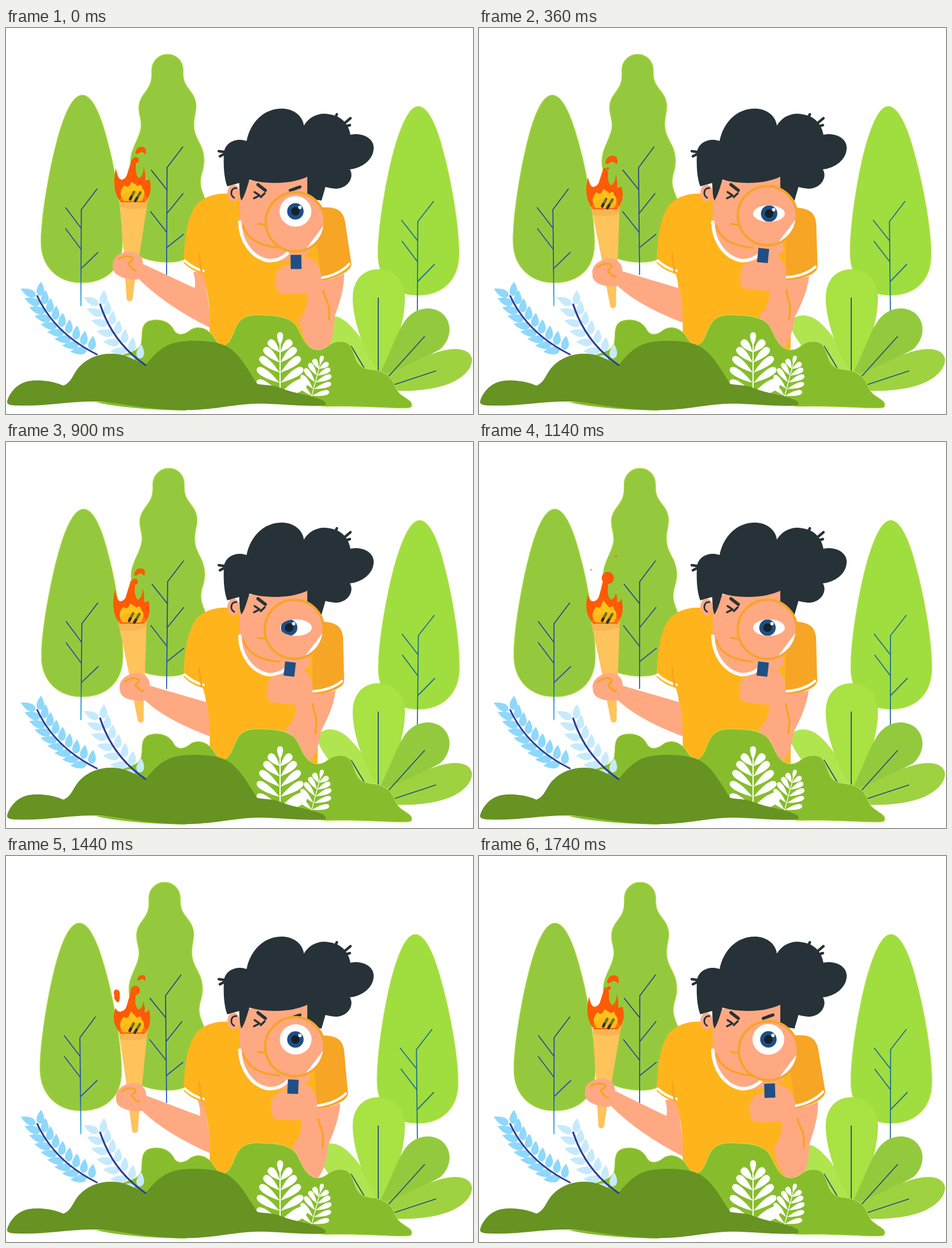
Animation, 823 px wide and 680 px high, one loop 1.8 s. Source, as an HTML page:

```html
<!DOCTYPE html>
<html lang="en">
<head>
<meta charset="utf-8">
<title>Explorer in the bushes</title>
<style>
html, body { margin: 0; width: 100%; height: 100%; overflow: hidden; background: #fff; }
svg { display: block; width: 823px; height: 680px; }
.line { fill: none; stroke-linecap: round; stroke-linejoin: round; }
.halo { stroke: #c6e65c; stroke-width: 1; }
.twig { fill: none; stroke-width: 1.8; }
.skin { fill: #ffa983; }
.fold { stroke: #f7a41f; stroke-width: 3.5; }
.white { stroke: #fff; stroke-width: 4.5; }
.ink { stroke: #263238; }
.fire { fill: #ff5a05; }
.stem { stroke: #2e3f98; stroke-width: 3; }
</style>
</head>
<body>
<svg viewBox="0 0 823 680" xmlns="http://www.w3.org/2000/svg">
  <defs>
    <linearGradient id="bark" gradientUnits="userSpaceOnUse" x1="0" y1="280" x2="0" y2="490">
      <stop offset="0" stop-color="#23468f"/><stop offset=".7" stop-color="#2458b0"/><stop offset="1" stop-color="#27b4ef"/>
    </linearGradient>
    <clipPath id="eyeClip"><ellipse id="eyeHole"/></clipPath>
  </defs>

  <g id="treeMid">
    <path class="halo" fill="#95c93d" d="M283 46C300 46 311 59 311 75C310 98 318 102 328 117C338 134 333 146 331 160C328 180 334 191 342 206C350 222 350 241 344 258C339 278 346 288 352 305C362 340 362 390 320 406C306 412 297 413 285 413C262 413 240 407 226 398C205 375 210 330 219 300C230 275 221 262 219 245C216 225 223 212 230 196C238 178 238 170 235 157C230 138 233 127 243 114C252 102 256 95 255 75C255 59 267 46 283 46Z"/>
    <path class="twig" stroke="url(#bark)" d="M283 435V246L311 209M283 285L255 250M283 327L312 291M283 360L254 323M283 387L313 363"/>
  </g>
  <g id="treeLeft">
    <path class="halo" fill="#95c93d" d="M133 118C150 118 165 150 178 200C192 250 205 330 205 378C205 425 175 449 133 449C90 449 61 420 61 376C61 330 75 250 88 200C101 150 116 118 133 118Z"/>
    <path class="twig" stroke="url(#bark)" d="M132 490V320L160 283M132 353L104 316M132 390L104 353M132 424L162 395"/>
  </g>
  <g id="treeRight">
    <path class="halo" fill="#a0dd3f" d="M725 138C742 138 758 172 770 220C785 275 798 350 798 398C798 445 768 471 726 471C683 471 655 442 655 398C655 350 667 275 681 220C694 172 709 138 725 138Z"/>
    <path class="twig" stroke="#1c6f93" d="M725 500V341L753 305M725 375L696 338M725 412L697 375M725 447L755 416"/>
  </g>

  <path fill="#b0e550" d="M547 520C555 504 578 500 600 518C625 540 645 575 658 607L600 605C580 570 555 550 547 520Z"/>
  <path fill="#a8e243" d="M656 425C688 425 703 450 703 476C703 520 682 580 658 609C635 580 611 520 611 475C611 447 627 425 656 425Z"/>
  <path fill="#93ca3d" d="M658 609C675 580 688 535 706 512C726 488 758 490 772 506C788 524 783 550 765 566C740 580 715 590 690 612Z"/>
  <path fill="#9fd241" d="M658 612C690 606 730 580 760 571C790 562 816 563 821 582C823 600 805 617 780 627C750 638 715 640 680 639Z"/>
  <path class="twig" stroke="#1d4f7c" d="M656 475V604M608 560L633 602M738 543L674 614M758 604L682 629"/>

  <path id="armL" class="skin"/>
  <g id="torch">
    <path fill="#ffc35c" d="M-26 -9H26L14 95L9 130L5 174Q0 180-5 174L-10 130L-13 95Z"/>
    <path fill="#f9b552" d="M-26 -9H26L23 11Q0 17-23 11Z"/>
    <g transform="translate(-219 -303)">
      <path class="skin" d="M187 418C185 405 197 395 211 393C221 390 231 394 237 402C243 412 240 430 232 441C222 443 205 440 195 434C189 430 186 424 187 418Z"/>
      <path class="line fold" d="M197 406C207 399 221 399 222 407C219 411 211 411 217 417C221 422 225 427 228 424"/>
    </g>
  </g>
  <g id="fire">
    <path id="flame" class="fire"/>
    <circle id="bud" class="fire" r="11"/>
    <path id="spark" class="fire" d="M-11 5C-10 -8 0 -11 8 -7C12 -2 11 4 9 7C5 1 0 1 -3 4C-6 6-9 7-11 5Z"/>
    <path id="ember" class="fire" d="M-3 -12C4 -13 7 -6 5 0C6 6 5 13 1 13C-4 9-7 5-5 0C-7 -5-7 -10-3 -12Z"/>
    <path id="glow" fill="#ffc21a"/>
    <path fill="#f8a11f" fill-opacity=".35" d="M-25 0C-22 -14-10 -17 0 -17C10 -17 22 -14 25 0Z"/>
    <path class="line" stroke="#66701f" stroke-width="4.5" d="M-6 -3L1 -16M3 0L12 -15"/>
    <path class="line" stroke="#2b3030" stroke-width="4.5" d="M-6 -3L-4 -7M3 0L6 -5"/>
  </g>

  <path fill="#ffb41c" d="M412 296C380 286 350 295 335 312C318 335 314 375 313 414C325 425 335 430 347 433C355 460 360 490 359 530V566H549C550 545 549 520 548 500L580 420V335L540 310Z"/>
  <path class="line white" d="M315 410C325 419 336 425 348 428"/>
  <path class="line fold" d="M341 399C341 410 343 420 345 431"/>

  <path class="skin" d="M411 270L532 262L536 300V395C505 412 480 411 463 411C430 405 413 372 412 341Z"/>
  <path class="line white" style="stroke-width:6" d="M412 342C413 372 430 404 463 410C478 410 488 405 496 397"/>
  <path class="line fold" d="M418 348C424 370 445 384 482 387M444 345L458 347"/>
  <path fill="#263238" d="M390 279C384 265 383 240 384 222C384 204 403 192 424 199C431 165 455 142 486 142C508 142 523 156 525 172C534 156 552 148 570 152C592 155 604 170 607 188C628 184 648 194 648 211C648 232 627 247 606 249C614 262 604 281 584 283C574 283 568 281 563 280L556 304L531 300V262C505 275 458 276 429 267C425 280 421 295 415 304C411 295 412 285 411 273Z"/>
  <path class="line ink" stroke-width="4.5" d="M375 217L389 219M377 226L390 219M583 152L576 168M607 159L588 175M606 171L588 177"/>
  <ellipse class="skin" cx="401" cy="291" rx="11" ry="15"/>
  <path class="line ink" stroke-width="3" d="M406 282C396 281 394 295 402 299"/>
  <path class="line ink" stroke-width="5.5" d="M444 276L457 286M501 286L518 280"/>
  <path class="line ink" stroke-width="3.5" d="M438 289L447 295L437 300M449 298L456 291"/>

  <g id="armR">
    <path fill="#f7a524" d="M556 316C575 318 592 320 594 345L596 422C592 436 565 443 540 444V380Z"/>
    <path class="skin" d="M466 418C474 408 484 410 489 408C503 395 520 396 528 404C538 412 541 425 541 444C558 444 572 440 581 437C578 465 565 490 555 510C552 530 545 562 525 572C500 570 490 525 494 505C505 495 512 480 511 462C498 463 480 460 466 458C455 450 462 438 460 428C461 424 463 420 466 418Z"/>
    <path class="line white" d="M542 439C560 438 580 432 592 421"/>
    <path class="line fold" d="M541 462C541 475 548 482 547 495C547 503 545 510 545 514"/>
  </g>

  <g id="lens">
    <path id="grip" fill="#1f4f85" d="M-9.500 58H9.500V83H-9.500Z"/>
    <circle class="skin" r="52" stroke="#f5a52a" stroke-width="4.500"/>
    <path fill="#fff" d="M49.500 7A50 50 0 0 1 20 46Z"/>
  </g>
  <ellipse id="eye" fill="#fff"/>
  <g clip-path="url(#eyeClip)">
    <g id="iris">
      <circle r="14.500" fill="#1f4e85"/><circle r="7.500" fill="#15212c"/><circle cx="8" cy="-7" r="3" fill="#fff"/>
    </g>
  </g>

  <path class="halo" fill="#87bd2d" d="M200 580C212 570 232 572 238 556C241 540 236 522 252 516C268 511 288 515 296 532C304 545 318 538 326 531C337 525 350 527 360 537C368 544 372 559 382 559C398 558 400 532 410 519C421 504 440 505 455 506C482 506 505 512 513 527C522 542 528 567 550 567C566 567 568 553 588 552C612 552 609 570 620 590C630 606 650 598 666 608C688 620 682 634 695 645C708 655 719 658 714 668C705 673 640 665 565 667L300 640Z"/>
  <path fill="#87bd2d" d="M157 659C200 669 260 673 320 674L260 660Z"/>
  <g id="ferns"></g>
  <path fill="#679322" d="M2 658C5 645 18 626 40 622C65 618 90 625 101 630C116 625 118 608 130 596C145 580 168 572 192 574C215 576 228 586 246 594C262 574 278 557 305 553C335 549 372 551 391 562C415 577 428 606 443 627C458 630 470 628 486 635C512 645 545 648 560 657C565 661 564 665 560 665C520 668 470 660 435 662C395 664 360 674 310 673C240 672 205 660 160 658C110 657 70 667 20 665C8 665 1 663 2 658Z"/>
  <path class="line stem" d="M166 487C180 530 205 566 246 594"/>
</svg>

<script>
const LOOP = 1800, STEP = 60, FLICKER = 450, TAU = 2 * Math.PI;
const $ = id => document.getElementById(id);
const set = (id, attrs) => { for (const k in attrs) $(id).setAttribute(k, attrs[k]); };
const move = (id, transform) => set(id, { transform });
const lerp = (a, b, u) => a + (b - a) * u;
// Eased 0 to 1 between two times
const ramp = (t, from, to) => {
  const u = Math.max(0, Math.min(1, (t - from) / (to - from)));
  return (1 - Math.cos(Math.PI * u)) / 2;
};

// Foliage
const pointed = (l, w) => `M0 0C${-w} ${-l * .1} ${-w} ${-l * .5} 0 ${-l}C${w} ${-l * .5} ${w} ${-l * .1} 0 0Z`;
const rounded = (l, w) => `M0 0C${-w} ${-l * .6} ${-w} ${-l} 0 ${-l}C${w} ${-l} ${w} ${-l * .6} 0 0Z`;
const leaf = (d, x, y, turn, color) =>
  `<path d="${d}" fill="${color}" transform="translate(${x} ${y}) rotate(${turn})"/>`;

function blueFern(stem, count, color) {
  const path = document.createElementNS('http://www.w3.org/2000/svg', 'path');
  path.setAttribute('d', stem);
  const length = path.getTotalLength();
  let s = '';
  for (let i = 0; i < count; i++) {
    const u = i / count, { x, y } = path.getPointAtLength(u * length);
    s += leaf(pointed(25, 9), x + 5, y, 4 + 4 * u, color);
    s += leaf(pointed(29, 9), x - 3, y, -64 - 36 * u, color);
  }
  return s + `<path class="line stem" d="${stem}"/>`;
}

function whiteFern(x, y, turn, scale) {
  let s = leaf(rounded(24, 7), 0, 26, 0, '#fff');
  for (let i = 0; i < 5; i++) {
    const size = 28 + 19 * Math.sin(i / 2);
    for (const side of [-1, 1]) s += leaf(rounded(size, 9), side, 37 + i * 18, side * (42 + i * 5), '#fff');
  }
  return `<g transform="translate(${x} ${y}) rotate(${turn}) scale(${scale})">${s}<path class="line" stroke="#fff" stroke-width="2" d="M0 5V112"/></g>`;
}

$('ferns').innerHTML =
  whiteFern(483, 534, 0, 1) + whiteFern(558, 576, 15, .68) +
  leaf(rounded(42, 13), 496, 648, 50, '#fff') +
  blueFern('M55 472C75 515 110 550 160 575', 9, '#8ed8fb') +
  blueFern('M166 487C180 530 205 566 246 594', 7, '#c6eafd');

// Leans a tree whose foot stays put.
function sway(id, top, foot, shift) {
  const k = -shift / (foot - top);
  move(id, `matrix(1 0 ${k} 1 ${-k * foot} 0)`);
}

// One bud swells on the middle tongue, breaks off as a spark, then fades as the next one grows.
function drawFire(t) {
  const u = (t + FLICKER - 300) % FLICKER / FLICKER;
  const wave = Math.sin(TAU * u);
  const left = -42 - 18 * ((u + .55) % 1);
  const mid = -70 - 12 * u;
  const right = -56 - 5 * wave, edge = -41 + 3 * wave;
  set('flame', { d: `M-22 2Q-40 -18 -31 ${left}Q-27 -34 -19 -38Q-13 -40 -11 -48Q-8 -58 -3 ${mid}Q6 ${mid + 4} 4 -58Q3 -48 9 -40Q17 -42 18 ${right}Q22 -44 20 -36Q27 -36 28 ${edge}Q35 -14 20 2Z` });
  set('glow', { d: `M-17 0Q-29 -14 -16 -28Q-9 -20 -4 ${-37 + 4 * wave}Q3 -30 7 -26Q14 -32 15 -23Q24 -14 14 0Z` });
  move('bud', `translate(4 ${mid + 2}) scale(${Math.sin(TAU * u / 4)})`);
  move('spark', `translate(${9 + 11 * u} ${-83 - 44 * u * u}) scale(${Math.cos(TAU * u / 4)})`);
  const age = Math.max(0, (u - .45) / .55);
  move('ember', `translate(${-29 + 5 * age} ${-58 - 46 * age}) scale(${age && 1.15 * (1 - age) ** 1.5})`);
}

function draw(t) {
  const lean = -3.8 * Math.cos(TAU * (t - 345) / 1085);
  sway('treeMid', 46, 435, lean);
  sway('treeLeft', 118, 490, lean);
  sway('treeRight', 138, 500, lean);

  const lift = Math.max(ramp(t, 1140, 1770), 1 - ramp(t, -120, 440));
  const at = (low, high) => lerp(low, high, lift);
  const x = at(252, 238), y = at(429, 413);
  set('armL', { d: `M${x} ${y}L${at(352, 330)} 458Q${at(352, 333)} 444 ${at(346, 328)} 430L349 428L363 ${at(520, 531)}Q280 489 ${x - 8} ${y + 25}Z` });
  const cup = `translate(${at(223, 225)} ${at(318, 303)})`;
  move('torch', `${cup} rotate(${at(-4.8, 3.2)})`);
  move('fire', cup);
  drawFire(t);

  move('armR', `rotate(${at(0, -8)} 556 316)`);
  move('lens', `translate(${at(508, 510)} ${at(330, 343)})`);
  move('grip', `rotate(${at(6.5, -2)})`);

  const open = Math.max(ramp(t, 1140, 1480), 1 - ramp(t, 0, 350));
  const glance = ramp(t, 320, 500) - 2 * ramp(t, 660, 840) + ramp(t, 960, 1200);
  const cy = lerp(327, 323, open);
  const eye = { cx: at(511, 510), cy, rx: 28, ry: lerp(14.5, 27, open) };
  set('eye', eye);
  set('eyeHole', eye);
  move('iris', `translate(${510 + 11 * glance} ${cy})`);
}

const start = performance.now();
function tick() {
  const t = (performance.now() - start) % LOOP;
  draw(Math.floor(t / STEP) * STEP);
  requestAnimationFrame(tick);
}
tick();
</script>
</body>
</html>
```
